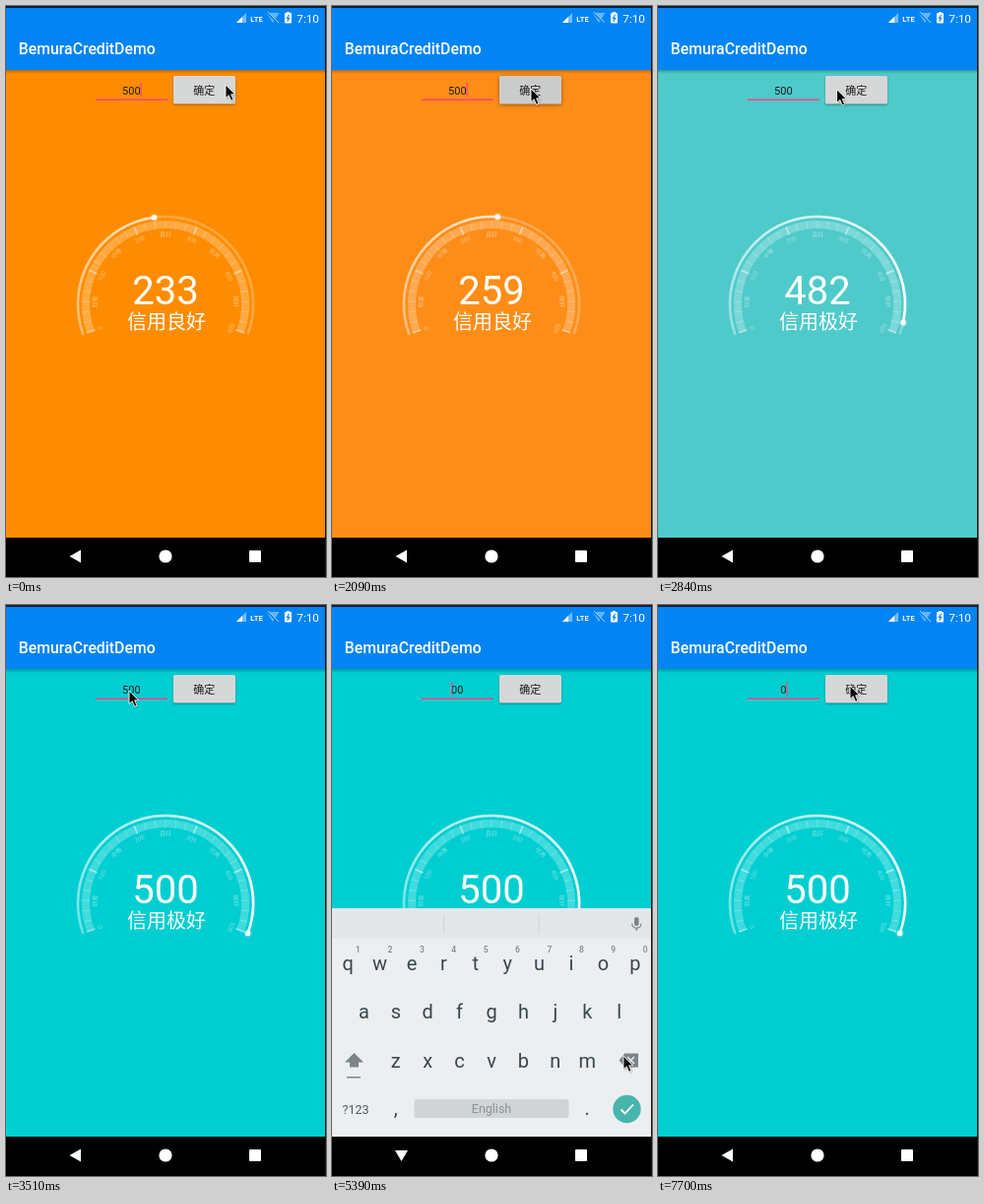
An HTML page with a canvas that plays this animation: 325 by 580 pixels, repeating every 8000 ms.

```html
<!DOCTYPE html>
<html lang="zh">
<head>
<meta charset="utf-8">
<title>Credit gauge</title>
<style>
html, body { margin: 0; width: 100%; height: 100%; overflow: hidden; background: #000; }
canvas { display: block; }
</style>
</head>
<body>
<canvas id="stage" width="325" height="580"></canvas>
<script>
const ctx = document.getElementById('stage').getContext('2d');
const LOOP = 8000, BLINK = 495, TAU = Math.PI * 2, RAD = Math.PI / 180;
const FONT = 'Roboto, "Noto Sans CJK SC", "Noto Sans CJK", sans-serif';
const BLUE = '#0284f4', PINK = '#ff4081', INK = '#1c1c1c';
const KEY = '#37474f', KEY_GREY = '#7b8589', KEY_BACK = '#eceff1';
const CX = 162, CY = 303, FIELD_X = 127.3, PITCH = 32.4;
const LEVELS = ['较差', '中等', '良好', '优秀', '极好'];

const at = (x, y) => ({ x, y });
const HOME = at(223, 80), BUTTON = at(202, 84), ERASE = at(296, 458);

// Pointer moves: start, end, destination
const MOVES = [
  [380, 560, at(216, 83)],
  [800, 890, BUTTON],
  [2490, 3510, at(125, 87)],
  [3900, 4640, at(299, 490)],
  [4700, 4920, ERASE],
  [5420, 5800, at(134, 88)],
  [5920, 6360, ERASE],
  [6540, 6930, at(70, 554)],
  [7120, 7620, at(195, 82)]
];

// Field states: time, content, caret index, handle visible
const EDITS = [
  [-90, '500', 3, false],
  [3780, '500', 1, true],
  [5050, '00', 0, false],
  [5880, '00', 2, true],
  [6520, '0', 1, false]
];

const clamp = v => Math.max(0, Math.min(1, v));
const ease = v => (1 - Math.cos(Math.PI * clamp(v))) / 2;
const between = (t, from, to) => t > from && t < to;
const white = a => `rgba(255,255,255,${a})`;

function rect(x, y, w, h, color, r = 0) {
  ctx.fillStyle = color;
  ctx.beginPath();
  ctx.roundRect(x, y, w, h, r);
  ctx.fill();
}

function disc(x, y, r, color) {
  ctx.fillStyle = color;
  ctx.beginPath();
  ctx.arc(x, y, r, 0, TAU);
  ctx.fill();
}

// Triangle with its tip at x, y, pointing along the given angle
function wedge(x, y, length, half, angle, color) {
  ctx.save();
  ctx.translate(x, y);
  ctx.rotate(angle * RAD);
  ctx.fillStyle = color;
  ctx.beginPath();
  ctx.lineTo(0, 0);
  ctx.lineTo(-length, half);
  ctx.lineTo(-length, -half);
  ctx.fill();
  ctx.restore();
}

function stroke(path, color, width) {
  ctx.strokeStyle = color;
  ctx.lineWidth = width;
  ctx.stroke(new Path2D(path));
}

function arc(r, from, to, color, width, cap = 'butt') {
  ctx.strokeStyle = color;
  ctx.lineWidth = width;
  ctx.lineCap = cap;
  ctx.beginPath();
  ctx.arc(CX, CY, r, from * RAD, to * RAD);
  ctx.stroke();
  ctx.lineCap = 'butt';
}

function text(str, x, y, size, color, align = 'center', weight = 400) {
  ctx.font = `${weight} ${size}px ${FONT}`;
  ctx.textAlign = align;
  ctx.fillStyle = color;
  ctx.fillText(str, x, y);
}

// Gamma-aware blend from orange to turquoise
function background(value) {
  const f = clamp((value - 257) / 243), to = [0, 206, 209];
  const mix = [255, 140, 0].map((a, i) => {
    const lin = (a / 255) ** 2.2 * (1 - f) + (to[i] / 255) ** 2.2 * f;
    return Math.round(255 * lin ** (1 / 2.2));
  });
  return `rgb(${mix})`;
}

function header() {
  rect(0, 0, 325, 65, BLUE);
  rect(0, 0, 325, 2, '#0b2038');
  const shade = ctx.createLinearGradient(0, 65, 0, 69);
  shade.addColorStop(0, 'rgba(0,0,0,.25)');
  shade.addColorStop(1, 'rgba(0,0,0,0)');
  rect(0, 65, 325, 4, shade);

  ctx.fillStyle = white(0.45);
  ctx.fill(new Path2D('M234 17h10v-10z'));
  ctx.fillStyle = '#fff';
  ctx.fill(new Path2D('M234 17h6v-6z'));
  text('LTE', 254.5, 15.5, 7.6, '#fff', 'center', 700);
  wedge(271, 17, 10, 6.5, 90, white(0.4));
  stroke('M265 6l11 11', BLUE, 2.4);
  stroke('M266 6l11 11', white(0.6), 1);
  rect(283, 7, 7, 10.5, '#fff', 1);
  rect(285, 6, 3, 1, '#fff');
  stroke('M287.5 9l-2 3.3h2.2l-2 3.3', BLUE, 1.2);
  text('7:10', 318, 16.5, 11.8, '#fff', 'right');
  text('BemuraCreditDemo', 12.8, 49, 15.8, '#fff', 'left', 500);
}

function gauge(value) {
  const end = 160 + value / 500 * 220;
  arc(81, 160, 380, white(0.25), 8);
  arc(89, 160, 380, white(0.25), 2.6);
  for (let i = 0; i <= 30; i++) {
    const major = i % 6 === 0;
    ctx.save();
    ctx.translate(CX, CY);
    ctx.rotate((i * 220 / 30 - 110) * RAD);
    stroke(`M0 -85V${major ? -76 : -77}`, white(major ? 0.5 : 0.3), major ? 1.6 : 0.8);
    if (major) text(i / 6 * 100, 0, -68.5, 6.3, white(0.45));
    if (i % 6 === 3) text(LEVELS[(i - 3) / 6], 0, -69.5, 6, white(0.5));
    ctx.restore();
  }
  const sweep = ctx.createConicGradient(0, CX, CY);
  [1, 0, 0.6, 1].forEach((a, i) => sweep.addColorStop(i / 3, white(a)));
  arc(89, 160, end, sweep, 2.6, 'round');
  ctx.save();
  ctx.shadowColor = '#fff';
  ctx.shadowBlur = 3;
  disc(CX + 89 * Math.cos(end * RAD), CY + 89 * Math.sin(end * RAD), 2.6, '#fff');
  ctx.restore();
  text(Math.round(value), CX, 303, 40, '#fff');
  text('信用' + LEVELS[Math.min(4, Math.floor(value / 100))], 163, 327.5, 20, '#fff');
}

function form(t) {
  const [since, str, index, handle] = EDITS.filter(e => e[0] <= t).pop();
  text(str, FIELD_X, 89.5, 11, INK);
  const digit = ctx.measureText('0').width;
  const caret = FIELD_X + (index - str.length / 2) * digit + 0.4;
  rect(91, 94.5, 73, 1.4, PINK);
  if (Math.floor((t - since) / BLINK) % 2 === 0) rect(caret - 0.5, 78, 1.2, 14.5, PINK);

  ctx.save();
  ctx.shadowColor = 'rgba(0,0,0,.4)';
  ctx.shadowBlur = between(t, 1640, 2700) ? 4 : 2;
  ctx.shadowOffsetY = 1;
  rect(170, 71, 63, 28.5, between(t, 1640, 2200) ? '#cacbcb' : '#d6d7d7', 1.5);
  ctx.restore();
  text('确定', 201.3, 89.5, 11, INK);

  if (handle) {
    wedge(caret, 94, 6, 6, -90, PINK);
    disc(caret, 103.5, 8, PINK);
  }
}

function keyRow(keys, x, y, size = 20, color = KEY, weight = 400) {
  [...keys].forEach((k, i) => text(k, x + i * PITCH, y, size, color, 'center', weight));
}

function keyboard(t) {
  const shown = ease((t - 3900) / 260) - ease((t - 7140) / 220);
  if (shown <= 0) return;
  ctx.save();
  ctx.beginPath();
  ctx.rect(0, 66, 324, 474);
  ctx.clip();
  ctx.translate(0, (1 - shown) * 232);
  rect(0, 308, 324, 232, KEY_BACK);
  rect(0, 308, 324, 31, '#e4e7e9');
  [113, 209.5].forEach(x => rect(x, 314, 1, 20, '#cfd3d5'));

  rect(307, 317, 4.6, 9, KEY_GREY, 2.3);
  stroke('M304.6 323.5a4.7 4.7 0 0 0 9.4 0M309.3 328v3', KEY_GREY, 1.2);

  keyRow('qwertyuiop', PITCH / 2, 371);
  keyRow('1234567890', PITCH / 2 + 10.3, 353, 8.5, KEY_GREY, 500);
  keyRow('asdfghjkl', PITCH, 420);
  keyRow('zxcvbnm', PITCH * 2, 470);

  wedge(22.5, 455, 9.5, 9.5, -90, KEY_GREY);
  rect(18, 464, 9, 5.5, KEY_GREY);
  rect(15, 479, 14, 1.5, KEY_GREY);

  if (between(t, 4980, 5150) || between(t, 6390, 6530)) rect(282, 444, 39, 37, '#c5c9cb');
  wedge(291.5, 462.5, 6, 7, 180, KEY_GREY);
  rect(297, 455.5, 14, 14, KEY_GREY);
  stroke('M300 459l7 7m0 -7l-7 7', KEY_BACK, 1.6);

  text('?123', 24, 516.5, 12.5, '#4a585f');
  text(',', PITCH * 2, 518, 20, KEY);
  rect(83.5, 502, 157, 19, '#d0d4d6', 2);
  text('English', CX, 516, 12.5, '#899297');
  text('.', PITCH * 8, 518, 20, KEY);
  disc(299.5, 512, 14.2, '#47b5ab');
  stroke('M293.5 512.5l4 4l8.5 -9', '#fff', 1.8);
  ctx.restore();
}

function navBar(t) {
  rect(0, 540, 325, 40, '#000');
  if (between(t, 3900, 7150)) wedge(70.5, 565, 11, 6.5, 90, '#fff');
  else wedge(64.5, 559, 11.5, 6.5, 180, '#fff');
  disc(CX, 559, 6.6, '#fff');
  rect(247, 553, 12, 12, '#fff', 1);
}

function pointer(t) {
  let { x, y } = HOME;
  for (const [from, to, goal] of MOVES) {
    const f = ease((t - from) / (to - from));
    x += (goal.x - x) * f;
    y += (goal.y - y) * f;
  }
  const shape = new Path2D('M0 0v13.5l3.2-2.8l2.4 5.6l2.4-1l-2.3-5.5h4.1z');
  ctx.save();
  ctx.translate(x, y);
  ctx.shadowColor = 'rgba(0,0,0,.35)';
  ctx.shadowBlur = 2;
  ctx.shadowOffsetX = ctx.shadowOffsetY = 1;
  ctx.fillStyle = '#000';
  ctx.fill(shape);
  ctx.shadowColor = 'transparent';
  stroke(shape, '#fff', 0.9);
  ctx.restore();
}

function draw(t) {
  const value = 233 + 267 * ease((t - 1850) / 1190);
  rect(0, 0, 325, 580, background(value));
  header();
  gauge(value);
  form(t);
  keyboard(t);
  navBar(t);
  rect(324, 0, 1, 580, '#151515');
  pointer(t);
}

const start = performance.now();
function tick() {
  draw((performance.now() - start) % LOOP);
  requestAnimationFrame(tick);
}
tick();
</script>
</body>
</html>
```
